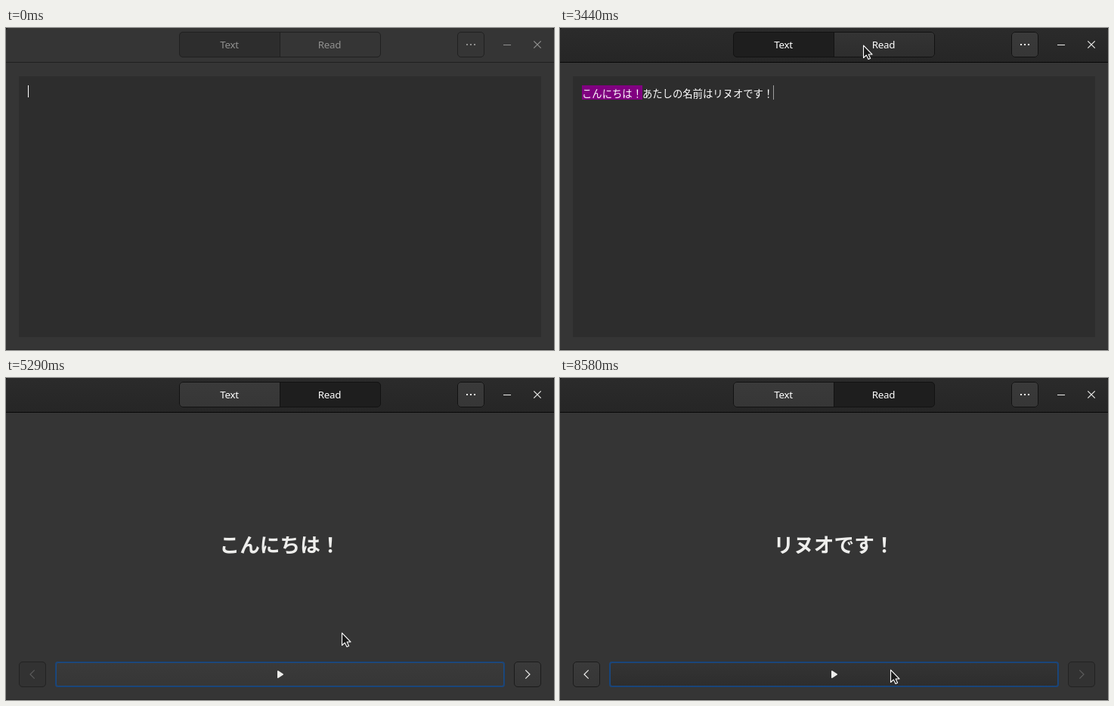
An HTML page for the animation above (8.65 s loop, 725 by 427 pixels).

```html
<!DOCTYPE html>
<html lang="ja">
<head>
<meta charset="utf-8">
<title>Reader</title>
<style>
  html, body { margin: 0; width: 100%; height: 100%; overflow: hidden; background: #1a1a1a; }
  svg { display: block; width: 725px; height: 427px; }
  text { font: 13.333px "Noto Sans", "Noto Sans CJK JP", sans-serif; fill: #fff; white-space: pre; }
  .ja { font-family: "Noto Sans CJK JP", "Noto Sans", sans-serif; }
  #word { font-size: 26.667px; font-weight: 700; fill: #eeeeec; text-anchor: middle; }
  .tab { text-anchor: middle; letter-spacing: -.25px; }
  .line { fill: none; stroke: #eeeeec; stroke-width: 1.2; }
  .solid { fill: #eeeeec; }
  .off .face { fill: #323232; }
  .off .line { stroke: #5b5b5b; }
  .off .edge { stroke: #222; }
  .edge { fill: none; stroke: #1b1b1b; }
  #head .edge { stroke: #121212; }
  .idle #bar { fill: #353535; }
  .idle #rule { fill: #202020; }
  .idle #head .face { fill: #353535; }
  .idle #head .dark { fill: #2d2d2d; }
  .idle #head .edge { stroke: #202020; }
  .idle #head text, .idle #head .solid { fill: #919190; }
  .idle #head .line { stroke: #919190; }
</style>
</head>
<body>
<svg id="app" viewBox="0 0 725 427">
  <defs>
    <linearGradient id="gBar" x2="0" y2="1"><stop stop-color="#2b2b2b"/><stop offset="1" stop-color="#262626"/></linearGradient>
    <linearGradient id="gFace" x2="0" y2="1"><stop stop-color="#3a3a3a"/><stop offset="1" stop-color="#363636"/></linearGradient>
    <linearGradient id="gHover" x2="0" y2="1"><stop stop-color="#343434"/><stop offset="1" stop-color="#2d2d2d"/></linearGradient>
    <clipPath id="stack"><rect x="17" y="64" width="691" height="346"/></clipPath>
    <clipPath id="frame"><path d="M0 427V5Q0 0 5 0H720Q725 0 725 5V427Z"/></clipPath>
    <clipPath id="tabs"><rect x="229" y="5" width="267" height="34" rx="5"/></clipPath>
  </defs>
  <g clip-path="url(#frame)">
    <rect width="725" height="427" fill="#353535"/>
    <g id="head">
      <rect id="bar" width="725" height="45" fill="url(#gBar)"/>
      <rect id="rule" y="45" width="725" height="1" fill="#070707"/>
      <g clip-path="url(#tabs)">
        <rect class="face" x="229" y="5" width="267" height="34" fill="url(#gFace)"/>
        <rect id="readHover" x="363" y="5" width="133" height="34" fill="url(#gHover)"/>
        <rect id="textOn" class="dark" x="229" y="5" width="133" height="34" fill="#1e1e1e"/>
        <rect id="readOn" class="dark" x="363" y="5" width="133" height="34" fill="#1e1e1e"/>
      </g>
      <path class="edge" d="M362.5 5V39"/>
      <rect class="edge" x="229.5" y="5.5" width="266" height="33" rx="4.5"/>
      <text class="tab" x="295.5" y="27">Text</text>
      <text class="tab" x="428" y="27">Read</text>
      <rect class="face" x="597" y="5" width="36" height="34" rx="5" fill="url(#gFace)"/>
      <rect class="edge" x="597.5" y="5.5" width="35" height="33" rx="4.5"/>
      <path class="solid" d="M609 21h2v2h-2zM614 21h2v2h-2zM619 21h2v2h-2zM658 22h10v1h-10z"/>
      <path class="line" d="M698.3 17.3L707.7 26.7M707.7 17.3L698.3 26.7"/>
    </g>

    <g clip-path="url(#stack)">
      <g id="edit">
        <rect x="17" y="64" width="691" height="346" fill="#2d2d2d"/>
        <g id="typed">
          <rect x="29" y="76" width="80" height="19" fill="#800080"/>
          <text class="ja" x="29" y="92">こんにちは！あたしの名前はリヌオです！</text>
        </g>
        <rect id="caret" y="76" width="1" fill="#fff"/>
      </g>
      <g id="read">
        <text id="word" class="ja" x="362.5" y="231"></text>
        <g id="prev">
          <rect class="face" x="17" y="376" width="36" height="34" rx="5" fill="url(#gFace)"/>
          <rect class="edge" x="17.5" y="376.5" width="35" height="33" rx="4.5"/>
          <path class="line" d="M37.700 387.300L32 393L37.700 398.700"/>
        </g>
        <g id="next">
          <rect class="face" x="672" y="376" width="36" height="34" rx="5" fill="url(#gFace)"/>
          <rect class="edge" x="672.5" y="376.5" width="35" height="33" rx="4.5"/>
          <path class="line" d="M687.300 387.300L693 393L687.300 398.700"/>
        </g>
        <g id="play">
          <rect x="65" y="376" width="595" height="34" rx="5" fill="url(#gFace)"/>
          <rect id="playHover" x="65" y="376" width="595" height="34" rx="5" fill="url(#gHover)"/>
          <rect id="playOn" x="65" y="376" width="595" height="34" rx="5" fill="#1e1e1e"/>
          <rect class="edge" x="65.5" y="376.5" width="594" height="33" rx="4.5"/>
          <path class="solid" d="M359 389Q359 387.500 360.400 388.200L366.500 392.200Q367.600 393 366.500 393.800L360.400 397.800Q359 398.500 359 397Z"/>
        </g>
        <g id="stop">
          <rect x="29" y="376" width="667" height="34" rx="5" fill="#1c1c1c"/>
          <circle class="line" cx="362" cy="393" r="7.400"/>
          <rect class="solid" x="359" y="390" width="6" height="6" rx="1"/>
        </g>
      </g>
    </g>
    <rect id="ring" fill="none" stroke="#15539e"/>
    <rect y="426" width="725" height="1" fill="#000" opacity=".25"/>
  </g>

  <g id="arrow">
    <path d="M.5 1.200V17.500L4.300 14L7 19.500L9.600 18.300L7.100 13H12Z" fill="#1a1a1a" stroke="#fff" stroke-width="1.100" stroke-linejoin="round"/>
  </g>
  <g id="beam" fill="none">
    <path d="M-4 -7H4M-4 7H4M0 -7V7" stroke="#fff" stroke-width="3"/>
    <path d="M-3 -7H3M-3 7H3M0 -7V7" stroke="#111"/>
  </g>
</svg>
<script>
const LOOP = 8650;
const $ = id => document.getElementById(id);

// time, x, y
const path = [
  [420, 0, 105], [520, 24, 115], [640, 62, 125], [780, 95, 134], [970, 112, 138],
  [2750, 112, 138], [2900, 140, 127], [3040, 215, 93], [3180, 316, 49],
  [3310, 380, 26], [3440, 401, 22], [3570, 404, 22],
  [4920, 404, 22], [5010, 409, 61], [5110, 425, 164], [5200, 438, 273],
  [5290, 444, 337], [5390, 442, 373], [5480, 438, 385],
  [5689, 438, 385], [5690, 437, 386]
];
const caret = [
  [1550, 1], [1630, 0], [2029, 0], [2030, 1],
  [2710, 1], [3000, 0], [3290, 0], [3570, 1]
];
const words = [
  [0, "こんにちは！"], [6410, "あたしの"], [6580, "名前"],
  [6710, "は"], [6880, "リヌオです！"]
];

const ramp = (t, a, b) => Math.min(1, Math.max(0, (t - a) / (b - a)));
const outQuad = p => 1 - (1 - p) ** 2;
const outCubic = p => 1 - (1 - p) ** 3;
const fade = (t, a, b) => outQuad(ramp(t, a, b));

function sample(rows, t) {
  const i = rows.findIndex(r => r[0] > t);
  if (i < 0) return rows.at(-1).slice(1);
  if (i === 0) return rows[0].slice(1);
  const a = rows[i - 1], b = rows[i], p = ramp(t, a[0], b[0]);
  return a.slice(1).map((v, k) => v + (b[k + 1] - v) * p);
}

function set(id, attrs) {
  for (const k in attrs) $(id).setAttribute(k, attrs[k]);
}
const show = (id, on) => set(id, { visibility: on ? "visible" : "hidden" });
const alpha = (id, v) => set(id, { opacity: v });
const move = (id, x, y) => set(id, { transform: `translate(${x} ${y})` });

function drawRing(t, dx) {
  const e = t < 6130 ? fade(t, 4360, 4560)
    : t < 6240 ? 1 - fade(t, 6100, 6300)
    : fade(t, 8310, 8560);
  show("ring", e > 0 && (t < 6240 || t > 8000));
  const out = 4 - 5 * e;
  set("ring", {
    x: 65 - out + dx, y: 376 - out, width: 595 + 2 * out, height: 34 + 2 * out,
    rx: 4 + out, "stroke-width": 2 * e, opacity: 0.7 * e,
    "clip-path": dx ? "url(#stack)" : "none"
  });
}

function drawPointer(t) {
  const [x, y] = sample(path, t).map(Math.round);
  const inText = t < 4000 && x >= 17 && y >= 64;
  show("arrow", t >= 420 && !inText);
  show("beam", t >= 420 && inText);
  move("arrow", x, y);
  move("beam", x - 0.5, y + 0.5);
}

function draw(t) {
  $("app").classList.toggle("idle", t < 1170);
  alpha("textOn", 1 - fade(t, 4030, 4230));
  alpha("readOn", fade(t, 3900, 3990));
  alpha("readHover", fade(t, 3240, 3440));

  const slide = Math.round(691 * outCubic(ramp(t, 4040, 4540)));
  const dx = 691 - slide;
  move("edit", -slide, 0);
  move("read", dx, 0);
  show("edit", dx > 0);
  show("read", slide > 0);

  const typed = t >= 2030;
  show("typed", typed && dx > 0);
  set("caret", { x: typed ? 282 : 29, height: typed ? 19 : 16, opacity: sample(caret, t)[0] });

  $("word").textContent = words.findLast(w => w[0] <= t)[1];
  const reading = t >= 6240 && t < 7010, done = t >= 7010;
  for (const id of ["prev", "next", "play"]) show(id, slide > 0 && !reading);
  show("stop", reading);
  $("prev").classList.toggle("off", !done);
  $("next").classList.toggle("off", done);
  alpha("playHover", fade(t, 5380, 5480));
  alpha("playOn", done ? 0 : fade(t, 6110, 6180));

  drawRing(t, dx);
  drawPointer(t);
}

const start = performance.now();
function tick() {
  draw((performance.now() - start) % LOOP);
  requestAnimationFrame(tick);
}
tick();
</script>
</body>
</html>
```
